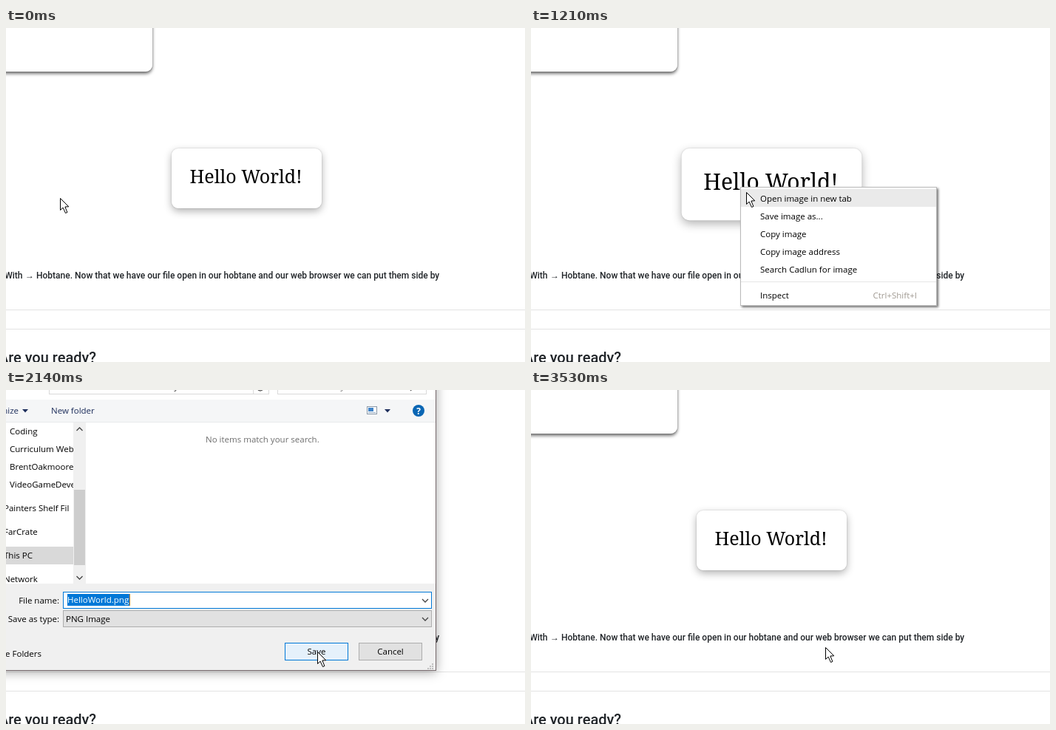
An HTML page with a canvas for the animation above (4.46 s loop, 702 by 452 pixels).

```html
<!DOCTYPE html>
<html lang="en">
<head>
<meta charset="utf-8">
<title>Saving an image</title>
<style>
  html, body { margin: 0; width: 100%; height: 100%; overflow: hidden; background: #fff; }
  canvas { display: block; }
</style>
</head>
<body>
<canvas id="stage" width="702" height="452"></canvas>
<script>
const W = 702, H = 452, LOOP = 4460, PAD = 20;
const UI = '11.5px "Open Sans", "Noto Sans", sans-serif';
const BODY = '500 12px Roboto, sans-serif';
const BLUE = '#0078d7';

const screen = document.getElementById('stage').getContext('2d');
const layer = document.createElement('canvas');
layer.width = W + PAD;
layer.height = H + PAD;
const panel = layer.getContext('2d');

// Cursor moves: first change, last change, number of steps, end point.
const START = [73, 230];
const MOVES = [
  [130, 590, 7, [283, 215]],
  [1130, 1590, 7, [323, 249]],
  [1910, 1990, 2, [421, 354]],
  [2220, 2300, 2, [399, 354]],
  [2450, 2530, 2, [398, 348]]
];

// Dialog opacity from each time on.
const FADE = [
  [0, 0], [1910, 0.25], [1990, 0.64], [2070, 0.88], [2140, 1],
  [2990, 0.94], [3080, 0.74], [3140, 0.32], [3220, 0]
];

const smooth = p => p * p * (3 - 2 * p);

function cursorAt(t) {
  let at = START;
  for (const [t0, t1, n, to] of MOVES) {
    if (t < t0) break;
    const step = Math.floor((t - t0) / (t1 - t0) * (n - 1) + 1e-6) + 1;
    const p = smooth(Math.min(1, step / n));
    at = at.map((v, i) => Math.round(v + (to[i] - v) * p));
  }
  return at;
}

function opacityAt(t) {
  let value = 0;
  for (const [from, o] of FADE) if (t >= from) value = o;
  return value;
}

function text(g, str, x, y, color = '#000', font = UI, align = 'left') {
  g.font = font;
  g.fillStyle = color;
  g.textAlign = align;
  g.fillText(str, x, y);
}

function rect(g, x, y, w, h, color) {
  g.fillStyle = color;
  g.fillRect(x, y, w, h);
}

function box(g, x, y, w, h, fill, border) {
  rect(g, x, y, w, h, border);
  rect(g, x + 1, y + 1, w - 2, h - 2, fill);
}

function line(g, points, color, width = 1) {
  g.beginPath();
  points.forEach(([x, y]) => g.lineTo(x, y));
  g.strokeStyle = color;
  g.lineWidth = width;
  g.stroke();
}

function chevron(g, x, y, dir, color = '#444') {
  line(g, [[x - 4, y - 2 * dir], [x, y + 2 * dir], [x + 4, y - 2 * dir]], color, 1.3);
}

function triangle(g, x, y, color) {
  g.beginPath();
  g.moveTo(x - 4, y - 2);
  g.lineTo(x + 4, y - 2);
  g.lineTo(x, y + 2.5);
  g.fillStyle = color;
  g.fill();
}

function card(g, x, y, w, h, r, shadows) {
  g.save();
  g.fillStyle = '#fff';
  for (const [dy, blur, alpha] of shadows) {
    g.shadowColor = `rgba(0,0,0,${alpha})`;
    g.shadowOffsetY = dy;
    g.shadowBlur = blur;
    g.beginPath();
    g.roundRect(x, y, w, h, r);
    g.fill();
  }
  g.restore();
}

function drawPage(g, zoom) {
  rect(g, 0, 0, W, H, '#fff');
  card(g, -40, -60, 238, 119, 9, [[3, 4, 0.55], [0, 2, 0.3]]);

  const w = 203 * zoom;
  card(g, 325.5 - w / 2, 163, w, 81 * zoom, 9 * zoom,
    [[4 * zoom, 11 * zoom, 0.3], [0, 2, 0.2]]);
  text(g, 'Hello World!', 325.5 - zoom, 163 + 47 * zoom, '#000',
    `${25 * zoom}px "Noto Serif", serif`, 'center');

  text(g, 'With', 22.5, 339, '#212529', BODY, 'right');
  text(g, '→', 26, 339, '#212529', BODY);
  text(g, 'Hobtane. Now that we have our file open in our hobtane and our ' +
    'web browser we can put them side by', 41, 339, '#212529', BODY);
  rect(g, 0, 381, W, 1, '#e3e3e3');
  rect(g, 0, 407, W, 1, '#e3e3e3');
  text(g, 'Are you ready?', 122, 453, '#212529', '500 20px Roboto, sans-serif', 'right');
}

function drawMenu(g, cursorY) {
  g.save();
  g.shadowColor = 'rgba(0,0,0,.55)';
  g.shadowOffsetX = g.shadowOffsetY = 2;
  g.shadowBlur = 3;
  rect(g, 283, 215, 266, 161, '#bababa');
  g.restore();
  rect(g, 284, 216, 264, 159, '#fff');

  const row = Math.floor((cursorY - 218) / 24);
  if (row >= 0) rect(g, 284, 218 + row * 24, 264, 24, '#eaeaea');
  ['Open image in new tab', 'Save image as...', 'Copy image',
    'Copy image address', 'Search Cadlun for image'
  ].forEach((label, i) => text(g, label, 310, 235 + i * 24));
  rect(g, 284, 343, 264, 1, '#e6e6e6');
  text(g, 'Inspect', 310, 366);
  text(g, 'Ctrl+Shift+I', 522, 366, '#a09a92', UI, 'right');
}

function drawAddressBar(g) {
  box(g, 58, -20, 298, 26, '#fff', '#d9d9d9');
  rect(g, 334, -20, 1, 25, '#d9d9d9');
  rect(g, 63, -9, 13, 9, '#f6cf70');
  text(g, '«', 82, -1, '#333');
  text(g, 'Personal Do...  ›', 95, -1, '#333');
  text(g, 'Memory Photos', 188, -1, '#333');
  chevron(g, 324, -3, 1);
  g.beginPath();
  g.arc(344, -3, 4, -0.6, 4.6);
  g.strokeStyle = '#555';
  g.stroke();
  rect(g, 44, -12, 1, 12, '#555');
  box(g, 367, -20, 202, 26, '#fff', '#d9d9d9');
  text(g, 'Search Memory Photos', 374, -1, '#777');
  line(g, [[547, 1], [552, -4]], '#666', 1.5);
}

function drawToolbar(g) {
  const ink = '#1e2f5c';
  rect(g, -PAD, 13, 601, 31, '#f5f6f7');
  rect(g, -PAD, 43, 601, 1, '#e8eaec');
  text(g, 'Organize', 17, 32, ink, UI, 'right');
  triangle(g, 26, 28, ink);
  text(g, 'New folder', 61, 32, ink);
  box(g, 488, 22, 14, 11, '#fff', '#8a98a8');
  rect(g, 490, 24, 7, 5, '#3f83c8');
  rect(g, 490, 30, 10, 1, '#9ab0c8');
  triangle(g, 516, 28, ink);
  g.beginPath();
  g.arc(558, 28, 8, 0, Math.PI * 2);
  g.fillStyle = '#0a66b4';
  g.fill();
  text(g, '?', 558, 32.5, '#fff', '700 12px "Open Sans", sans-serif', 'center');
}

function drawSidebar(g) {
  g.save();
  g.beginPath();
  g.rect(-PAD, 44, 111, 218);
  g.clip();
  rect(g, -PAD, 212, 111, 24, '#d9d9d9');
  ['Coding', 'Curriculum Web', 'BrentOakmoore', 'VideoGameDeve'].forEach((name, i) => {
    rect(g, -10, 50 + i * 24, 9, 12, i ? '#f7d384' : '#e58b5a');
    text(g, name, 5, 60 + i * 24);
  });
  ['Painters Shelf Fil', 'FarCrate', 'This PC', 'Network']
    .forEach((name, i) => text(g, name, -3, 164 + i * 32));
  g.restore();

  rect(g, 91, 44, 17, 218, '#f0f0f0');
  rect(g, 92, 135, 15, 102, '#cdcdcd');
  chevron(g, 99.5, 53, -1);
  chevron(g, 99.5, 254, 1);
}

function button(g, label, x, fill, border) {
  box(g, x, 342, 86, 24, fill, border);
  text(g, label, x + 43, 358, '#000', UI, 'center');
}

function drawForm(g, hot, pressed, caret) {
  rect(g, -PAD, 262, 601, 117, '#f0f0f0');
  text(g, 'File name:', 72, 289, '#000', UI, 'right');
  box(g, 77, 273, 499, 23, '#fff', BLUE);
  rect(g, 83, 276, 85, 16, BLUE);
  text(g, 'HelloWorld.png', 83, 288, '#fff');
  if (caret) rect(g, 167, 276, 1, 16, '#e08a30');
  chevron(g, 567, 285, 1);

  text(g, 'Save as type:', 72, 314, '#000', UI, 'right');
  box(g, 77, 298, 499, 23, '#e1e1e1', '#adadad');
  text(g, 'PNG Image', 81, 314);
  chevron(g, 567, 310, 1);

  text(g, 'Hide Folders', 48, 361, '#000', UI, 'right');
  button(g, 'Save', 377, pressed ? '#cce4f7' : hot ? '#e5f1fb' : '#e1e1e1', BLUE);
  button(g, 'Cancel', 477, '#e1e1e1', '#adadad');
  for (let i = 0; i < 3; i++)
    for (let j = 0; j <= i; j++) rect(g, 576 - j * 3, 370 + i * 3, 2, 2, '#bfbfbf');
}

function drawDialog(g, t, [x, y]) {
  g.setTransform(1, 0, 0, 1, 0, 0);
  g.clearRect(0, 0, W + PAD, H + PAD);
  g.translate(PAD, PAD);
  g.save();
  g.shadowColor = 'rgba(0,0,0,.35)';
  g.shadowBlur = 14;
  g.shadowOffsetY = 2;
  rect(g, -80, -80, 662, 460, '#75686b');
  g.restore();
  rect(g, -PAD, -PAD, 601, 399, '#fff');
  drawAddressBar(g);
  drawToolbar(g);
  drawSidebar(g);
  text(g, 'No items match your search.', 270, 71, '#6d6d6d');
  drawForm(g, x >= 377 && x < 463 && y >= 342, t >= 2910, t < 2450 || t >= 2910);
}

function drawCursor(g, [x, y]) {
  g.save();
  g.translate(x + 0.5, y + 0.5);
  g.beginPath();
  [[0, 0], [0, 16], [3.6, 12.6], [7, 20], [9.4, 19], [6.4, 11.5], [11.3, 11.3]]
    .forEach(p => g.lineTo(...p));
  g.closePath();
  g.fillStyle = '#fff';
  g.fill();
  g.strokeStyle = '#000';
  g.lineWidth = 1;
  g.stroke();
  g.restore();
}

function draw(t) {
  const cursor = cursorAt(t);
  const alpha = opacityAt(t);
  const zoomed = cursor[0] >= 224 && t < 3530;
  drawPage(screen, zoomed ? 1.2 : 1);
  if (t >= 820 && t < 1760) drawMenu(screen, cursor[1]);
  if (alpha > 0) {
    drawDialog(panel, t, cursor);
    const s = 0.95 + 0.05 * alpha;
    screen.save();
    screen.globalAlpha = alpha;
    screen.translate(265 * (1 - s), 139 * (1 - s));
    screen.scale(s, s);
    screen.drawImage(layer, -PAD, -PAD);
    screen.restore();
  }
  drawCursor(screen, cursor);
}

const begin = performance.now();
function tick() {
  draw((performance.now() - begin) % LOOP);
  requestAnimationFrame(tick);
}
tick();
</script>
</body>
</html>
```
